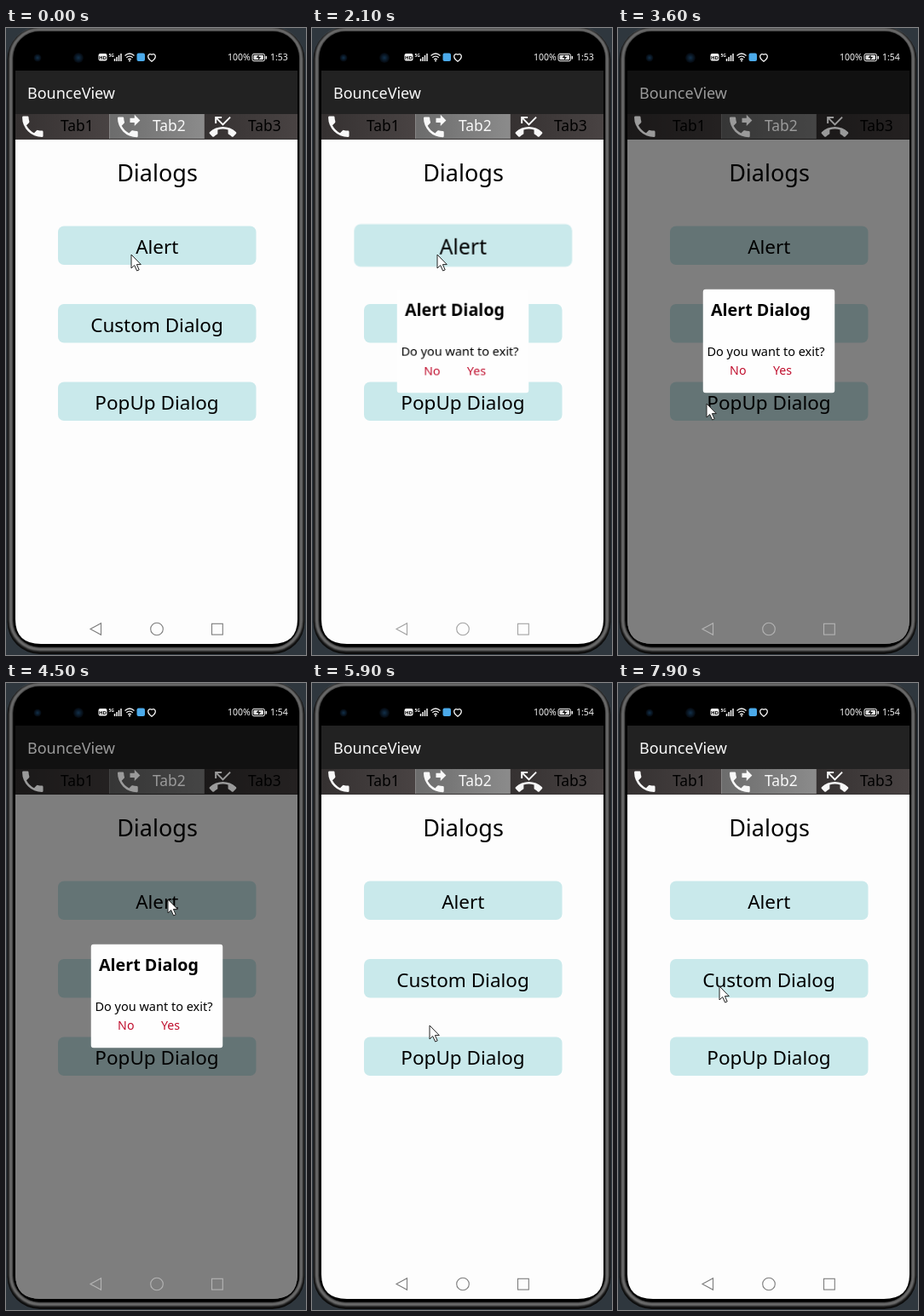
An HTML page for the animation above (8 s loop, 352 by 736 pixels).

```html
<!DOCTYPE html>
<html lang="en">
<head>
<meta charset="utf-8">
<title>BounceView</title>
<style>
html, body { margin: 0; height: 100%; overflow: hidden; background: #2f373e; }
svg { display: block; width: 100vw; height: 100vh; font-family: "Noto Sans", "Open Sans", sans-serif; }
.mid { text-anchor: middle; }
.label { font-size: 22.5px; text-anchor: middle; }
.tab { font-size: 17.4px; }
.status { font-size: 10.5px; font-weight: 500; fill: #f4f4f4; }
.btn { fill: #c9e9eb; }

.press, .dim, .dialog, .content, .before, .after, .nav, .lit { animation: 8s step-end infinite; }
.press { transform-origin: 177px 255px; animation-name: press; }
.dim { opacity: 0; animation-name: dim; }
.dialog { opacity: 0; animation-name: dialog; }
.content { transform-origin: 171px 354px; animation-name: pop; }
.before { animation-name: before; }
.after { opacity: 0; animation-name: after; }
.nav { fill: none; stroke: #7c7c7c; stroke-width: 1.1; animation-name: nav; }
.lit { fill: #f8f8f8; animation-name: lit; }
.cursor { animation: move 8s linear infinite; }

@keyframes press {
  0% { transform: scale(1); }
  22.5% { transform: scale(.96); }
  23.75% { transform: scale(.9); }
  25% { transform: scale(1); }
  26.25% { transform: scale(1.1); }
  27.5%, 100% { transform: scale(1); }
}
@keyframes dim {
  0% { opacity: 0; }
  27.5% { opacity: .5; }
  73.75%, 100% { opacity: 0; }
}
@keyframes dialog {
  0% { opacity: 0; }
  26.25% { opacity: 1; }
  73.75%, 100% { opacity: 0; }
}
@keyframes pop {
  0% { transform: scale(1); }
  27.5% { transform: scale(1.04); }
  28.75% { transform: scale(1.05); }
  30% { transform: scale(1.025); }
  31.25% { transform: scale(1.01); }
  32.5%, 100% { transform: scale(1); }
}
@keyframes before { 0% { opacity: 1; } 38.75%, 100% { opacity: 0; } }
@keyframes after { 0% { opacity: 0; } 38.75%, 100% { opacity: 1; } }
@keyframes nav {
  0% { stroke: #7c7c7c; }
  26.25% { stroke: #a2a2a2; }
  27.5% { stroke: #b4b4b4; }
  73.75%, 100% { stroke: #7c7c7c; }
}
@keyframes lit {
  0% { fill: #f8f8f8; }
  27.5% { fill: #9a9a9a; }
  73.75%, 100% { fill: #f8f8f8; }
}
/* the pointer moves in steps of 100 ms */
@keyframes move {
  0% { transform: translate(147px, 266px); }
  33.75% { transform: translate(147px, 266px); animation-timing-function: steps(3, start); }
  37.5% { transform: translate(122px, 312px); animation-timing-function: steps(3, start); }
  41.25% { transform: translate(100px, 400px); animation-timing-function: steps(4, start); }
  46.25% { transform: translate(104px, 441px); animation-timing-function: steps(3, start); }
  50% { transform: translate(64px, 400px); animation-timing-function: steps(3, start); }
  53.75% { transform: translate(110px, 300px); animation-timing-function: steps(3, start); }
  57.5% { transform: translate(190px, 254px); animation-timing-function: steps(3, start); }
  61.25% { transform: translate(215px, 350px); animation-timing-function: steps(3, start); }
  65% { transform: translate(138px, 402px); }
  82.5% { transform: translate(138px, 402px); animation-timing-function: steps(4, start); }
  87.5% { transform: translate(132px, 424px); animation-timing-function: steps(5, start); }
  93.75%, 100% { transform: translate(119px, 356px); }
}
</style>
</head>
<body>
<svg viewBox="0 0 352 736" preserveAspectRatio="none">
  <defs>
    <clipPath id="screen"><path d="M11 50H342V694Q342 723 312 723H41Q11 723 11 694Z"/></clipPath>
    <clipPath id="card"><rect x="99.5" y="306.5" width="155" height="122" rx="4"/></clipPath>
    <filter id="soft" x="-5%" y="-5%" width="110%" height="110%"><feGaussianBlur stdDeviation="1"/></filter>
    <linearGradient id="side"><stop stop-color="#353131"/><stop offset="1" stop-color="#494343"/></linearGradient>
    <linearGradient id="active"><stop stop-color="#6c6c6c"/><stop offset="1" stop-color="#8b8b8b"/></linearGradient>
    <radialGradient id="lens"><stop stop-color="#12304a"/><stop offset="1" stop-color="#03060b"/></radialGradient>
    <path id="phone" d="M6.6 10.8q2.2 4.4 6.6 6.6l2.2-2.2q.5-.4 1-.2 1.7.5 3.6.5 1 0 1 1V20q0 1-1 1A17 17 0 0 1 3 4Q3 3 4 3H7.5q1 0 1 1 0 1.8.6 3.6.1.6-.3 1z"/>
  </defs>

  <!-- phone body -->
  <rect width="352" height="736" fill="#2f373e"/>
  <rect x="1.500" y="-1" width="349" height="736" rx="38" fill="#0c0c0c"/>
  <rect x="5.500" y="1.500" width="341" height="728" rx="34" fill="#000" stroke="#747474" stroke-width="3.500" filter="url(#soft)"/>
  <rect x="8.500" y="4" width="335.500" height="722.500" rx="31" fill="#000"/>

  <!-- status bar -->
  <circle cx="37" cy="35" r="4.500" fill="url(#lens)"/>
  <circle cx="85" cy="35" r="6" fill="url(#lens)"/>
  <rect x="108.500" y="30" width="10" height="8.500" rx="2" fill="#f4f4f4"/>
  <text x="113.500" y="36.700" class="mid" font-size="6" font-weight="700">HD</text>
  <text x="120.500" y="33.500" font-size="5" font-weight="700" fill="#f4f4f4">5G</text>
  <path d="M127.500 39V36M130 39V34M132.500 39V32M135 39V30" stroke="#f4f4f4" stroke-width="1.5"/>
  <g fill="none" stroke="#f4f4f4" stroke-width="1.3">
    <path d="M139.500 32.500Q145 27.500 150.500 32.500M141.300 34.800Q145 31.500 148.700 34.800M143.200 37Q145 35.500 146.800 37"/>
    <path d="M171 39.200Q166.500 36 166.700 33 167.500 29.500 171 31.200 174.500 29.500 175.300 33 175.500 36 171 39.200Z"/>
    <rect x="289" y="30.300" width="14.500" height="8.500" rx="2" stroke-width="1"/>
  </g>
  <circle cx="145" cy="38.500" r="1" fill="#f4f4f4"/>
  <rect x="153.500" y="29.500" width="9.500" height="9.500" rx="2" fill="#4baaea"/>
  <rect x="290.500" y="31.800" width="11.500" height="5.500" rx="1" fill="#e0e0e0"/>
  <path d="M296.500 31.500 293.500 35H296V37.500L299.200 34H296.700Z" fill="#111"/>
  <path d="M305.300 33V36.500" stroke="#f4f4f4" stroke-width="1.400"/>
  <g class="status">
    <text x="260" y="38.200">100%</text>
    <text class="before" x="310" y="38.200">1:53</text>
    <text class="after" x="310" y="38.200">1:54</text>
  </g>

  <g clip-path="url(#screen)">
    <rect x="11" y="50" width="331" height="673" fill="#fdfdfd"/>
    <rect x="11" y="50" width="331" height="51" fill="#222"/>

    <!-- tabs -->
    <rect x="11" y="101" width="110.500" height="30" fill="url(#side)"/>
    <rect x="121.500" y="101" width="111" height="30" fill="url(#active)"/>
    <rect x="232.500" y="101" width="109.500" height="30" fill="url(#side)"/>
    <path d="M11 130.500H342" stroke="#393636"/>
    <g class="tab">
      <text x="64" y="121">Tab1</text>
      <text x="284" y="121">Tab3</text>
    </g>

    <!-- page -->
    <text class="mid" x="177.500" y="180" font-size="27">Dialogs</text>
    <g class="press">
      <rect class="btn" x="61" y="232.500" width="232.500" height="45.500" rx="7"/>
      <text class="label" x="177.300" y="265">Alert</text>
    </g>
    <rect class="btn" x="61" y="324" width="232.500" height="45.500" rx="7"/>
    <text class="label" x="177" y="356.500">Custom Dialog</text>
    <rect class="btn" x="61" y="415.500" width="232.500" height="45.500" rx="7"/>
    <text class="label" x="177" y="448">PopUp Dialog</text>

    <rect class="dim" x="11" y="50" width="331" height="673"/>

    <!-- light marks keep more of their brightness than the dimmed page -->
    <g class="lit">
      <text x="25" y="83" font-size="18" font-weight="500">BounceView</text>
      <text class="tab" x="172" y="121" font-weight="500">Tab2</text>
      <use href="#phone" transform="translate(15 99.500) scale(1.36)"/>
      <g transform="translate(127 100.500) scale(1.32)">
        <use href="#phone"/>
        <path d="M18 11 23 6 18 1V4H14V8H18Z"/>
      </g>
      <path transform="translate(238.500 100) scale(1.33)" d="M6.500 5.500 12 11 19 4 18 3 12 9 7.500 4.500H11V3H5V9H6.500ZM23.700 16.700A17 17 0 0 0 .3 16.700q-.5.7 0 1.400l2.500 2.500q.7.500 1.400 0 1.200-1.100 2.700-1.900.5-.3.500-.9V14.700q4.600-1.500 9.200 0v3.100q0 .6.500.9 1.500.8 2.700 1.900.7.500 1.400 0l2.500-2.500q.5-.7 0-1.400z"/>
    </g>
    <g class="nav">
      <path d="M99 705.500 111.500 698.700V712.300Z"/>
      <circle cx="177" cy="705.500" r="7.300"/>
      <rect x="241.500" y="699.300" width="12.800" height="12.800"/>
    </g>
  </g>

  <g class="dialog" clip-path="url(#card)">
    <rect x="99" y="306" width="156" height="123" fill="#fefefe"/>
    <g class="content mid">
      <text x="167.500" y="338" font-size="19.700" font-weight="700">Alert Dialog</text>
      <g font-weight="500">
        <text x="173.500" y="384.500" font-size="14.500">Do you want to exit?</text>
        <g font-size="14.200" fill="#c00f2e">
          <text x="140.800" y="407">No</text>
          <text x="193" y="407">Yes</text>
        </g>
      </g>
    </g>
  </g>

  <g class="cursor">
    <path d="M0 0V16L3.700 12.600 6.600 19 9.200 17.900 6.400 11.600H11.300Z" fill="#fff" stroke="#222"/>
  </g>
</svg>
</body>
</html>
```
